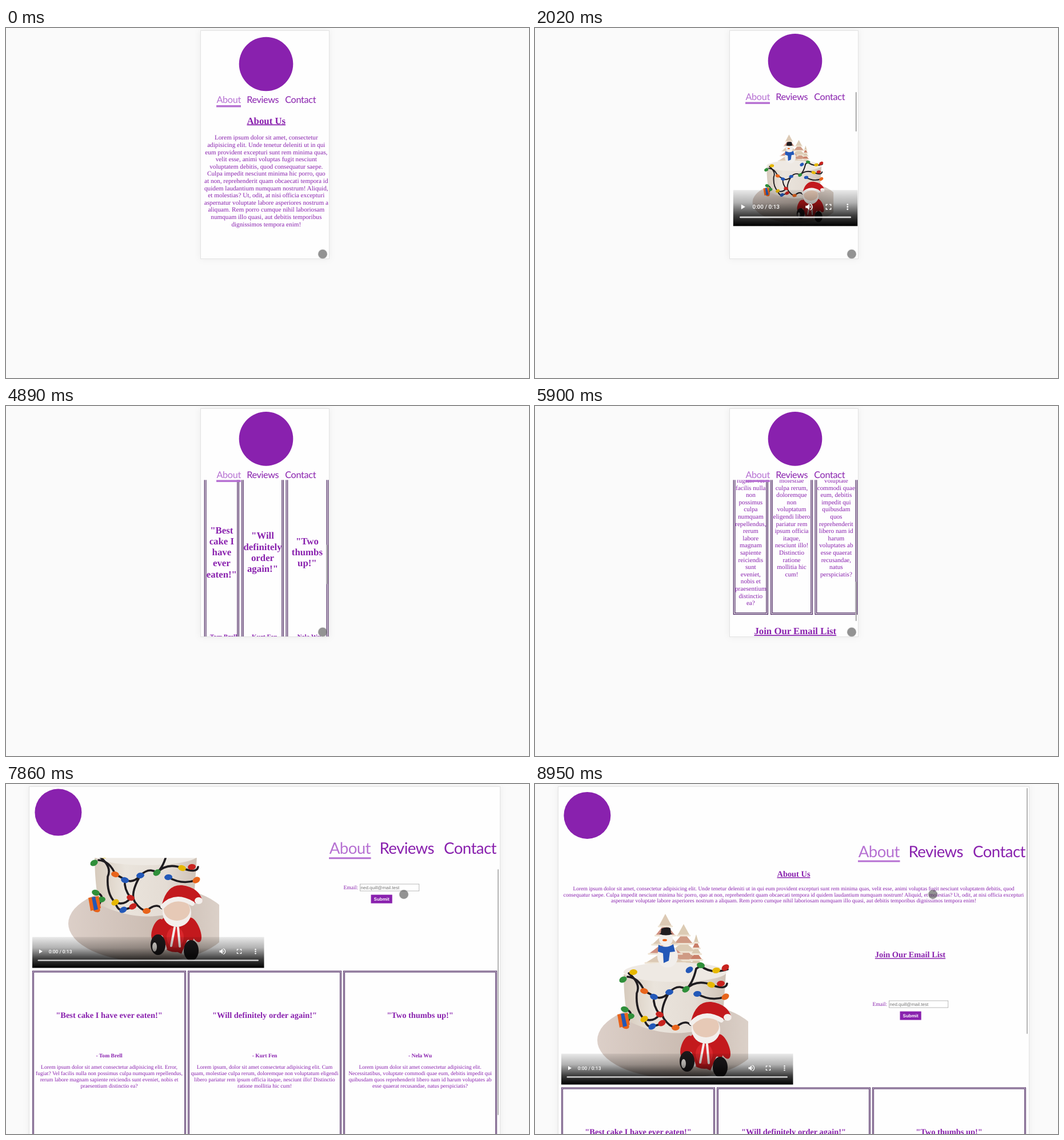
These frames come from a looping animation (915 by 612 pixels, 9250 ms). An HTML page:

```html
<!DOCTYPE html>
<html lang="en">
<head>
<meta charset="utf-8">
<title>Cake shop page</title>
<style>
  html, body { margin: 0; width: 100%; height: 100%; overflow: hidden; background: #fafafa; }
  svg { display: block; width: 100%; height: 100%; }
  text { font-family: "Liberation Serif", "Times New Roman", serif; fill: #8921ae; text-rendering: geometricPrecision; white-space: pre; }
  .nav { font-family: Lato, sans-serif; }
  .sans { font-family: "Liberation Sans", Arial, sans-serif; }
  .time { font-family: Roboto, sans-serif; font-weight: 500; fill: #fff; }
  .sheet { filter: drop-shadow(0 0 6px rgba(0, 0, 0, .06)); }
</style>
</head>
<body>
<svg id="stage" viewBox="0 0 915 612" xmlns="http://www.w3.org/2000/svg"></svg>
<script>
const LOOP = 9250, STEP = 77.75;
const PURPLE = '#8921ae', LILAC = '#b670d2', EDGE = '#4d2862';

const rect = (x, y, w, h, fill, more = '') =>
  `<rect x="${x}" y="${y}" width="${w}" height="${h}" fill="${fill}" ${more}/>`;
const oval = (x, y, rx, ry, fill, more = '') =>
  `<ellipse cx="${x}" cy="${y}" rx="${rx}" ry="${ry}" fill="${fill}" ${more}/>`;
const path = (d, fill, more = '') => `<path d="${d}" fill="${fill}" ${more}/>`;
const text = (x, y, size, str, more = 'text-anchor="middle"') =>
  `<text x="${x}" y="${y}" font-size="${size}" ${more}>${str}</text>`;
const lines = (x, y, size, gap, str, more) =>
  str.split('|').map((s, i) => text(x, y + i * gap, size, s, more)).join('');
const fade = (id, dir, ...stops) => `<linearGradient id="${id}" ${dir}>` + stops.map(([at, color, alpha = 1]) =>
  `<stop offset="${at}" stop-color="${color}" stop-opacity="${alpha}"/>`).join('') + '</linearGradient>';

const BOLD = 'text-anchor="middle" font-weight="bold"';
const TITLE = BOLD + ' text-decoration="underline"';

function tree(x, top, w, h, main, tint) {
  let out = '';
  for (let i = 4; i >= 0; i--) {
    const y = top + h * i / 5, half = w * (i + 2) / 12;
    out += path(`M${x - half} ${y + h / 4}L${x} ${y - 2}L${x + half} ${y + h / 4}Z`, i % 2 ? tint : main);
    out += path(`M${x - half} ${y + h / 4}H${x + half}`, 'none', 'stroke="#eee3d3" stroke-width="3" stroke-linecap="round"');
  }
  return out;
}

function cake() {
  const wire = d => path(d, 'none', 'stroke="#1f1c20" stroke-width="3.6" stroke-linecap="round"');
  const trim = (d, w) => path(d, 'none', `stroke="#f3efec" stroke-width="${w}" stroke-linecap="round"`);
  const hues = ['#2358b8', '#e6b800', '#e8641b', '#2f8f3a', '#c8231f'];
  const bulbs = [[224, 104], [244, 96], [271, 105], [287, 100], [145, 141], [189, 143], [218, 138], [262, 130],
    [279, 128], [287, 151], [162, 151], [121, 185], [145, 190], [172, 182], [200, 205], [159, 203],
    [111, 173], [126, 108], [176, 197], [112, 202], [238, 146], [108, 121]];
  return `<clipPath id="crop">${rect(0, 0, 327, 304.5, '#000')}</clipPath>` +
    fade('icing', '', [0, '#d6cabc'], [.3, '#eae4dc'], [.7, '#e4dcd4'], [1, '#cfc2b6']) +
    fade('board', '', [0, '#dccfc8'], [.6, '#c9bab0'], [1, '#dfd5cd']) +
    '<g id="cake" clip-path="url(#crop)">' +
    oval(204, 227, 141, 67, 'url(#board)') +
    tree(214, 26, 66, 72, '#dccbb4', '#cf9a84') +
    tree(236, 44, 26, 50, '#d9c8b0', '#c97f68') +
    tree(182, 8, 70, 80, '#dcc9b4', '#cf8f80') +
    path('M109 112Q110 170 118 194Q200 234 282 196L288 110Z', 'url(#icing)') +
    oval(199, 108, 90, 17, '#eee9e3') +
    oval(186, 80, 18, 20, '#f1eeeb') + oval(183, 50, 12, 12, '#f1eeeb') +
    path('M170 60Q184 68 196 59L199 72L190 73L188 88L179 92L178 75L169 72Z', '#2358b8') +
    path('M171 41Q183 46 195 41L192 40L191 31Q183 28 175 32L174 40Z', '#1f1c20') +
    oval(181, 52, 4, 2, '#e8641b') +
    wire('M291 103Q262 112 244 97L236 102Q230 128 218 138Q204 128 189 143Q176 158 162 150T145 141Q136 118 116 116') +
    wire('M118 110Q140 128 132 145Q130 176 145 190Q162 196 172 182Q160 166 162 151') +
    wire('M218 138Q236 120 262 130T290 128M189 143Q170 176 180 190T200 205Q216 190 226 200') +
    wire('M110 172Q124 176 121 185T112 202M145 190Q150 206 160 203T176 198M238 146Q262 160 287 151') +
    bulbs.map(([x, y], i) =>
      oval(x, y, 7, 5, hues[i * 3 % 5], `transform="rotate(${i * 47 % 70 - 35} ${x} ${y})"`)).join('') +
    path('M98 182L116 179L120 200L102 205Z', '#e8641b') + path('M104 181L110 180L115 202L108 204Z', '#2358b8') +
    oval(251, 243, 33, 34, '#c3191d') +
    oval(284, 238, 9, 23, '#c3191d', 'transform="rotate(-22 284 238)"') +
    oval(219, 238, 9, 20, '#c3191d', 'transform="rotate(20 219 238)"') +
    oval(234, 262, 17, 11, '#c3191d') + oval(266, 268, 17, 12, '#c3191d') +
    trim('M226 250L233 271M264 279L273 258', 5) +
    oval(253, 208, 25, 25, '#f3efec') + oval(253, 203, 23, 19, '#e6c9b6') +
    path('M227 193Q236 158 262 160Q292 164 298 188L281 192Q254 176 227 193Z', '#c3191d') +
    trim('M228 197Q250 174 280 192', 8) + oval(291, 187, 7, 6, '#f3efec') +
    oval(250, 251, 15, 18, '#d9262b') + trim('M249 234L243 266M255 234L258 267', 4) +
    oval(220, 264, 13, 18, '#1c191b') + oval(278, 274, 13, 18, '#1c191b') + oval(214, 268, 4, 8, '#ece7e2') +
    '</g>';
}

function video(x, y, w, k) {
  const h = w * .751, end = w / k;
  return `<g transform="translate(${x} ${y})"><use href="#cake" transform="scale(${w / 405.5})"/>
    <g transform="translate(0 ${h}) scale(${k})">` +
    rect(0, -90, end, 90, 'url(#shade)') +
    path('M20 -54V-42L30 -48Z', '#fff') +
    text(48, -43, 14, '0:00 / 0:13', 'class="time"') +
    rect(16, -24, end - 32, 4, '#fff', 'rx="2" opacity=".82"') +
    `<g transform="translate(${end - 121} -48)" fill="#fff"><path d="M-9 -3H-5L0 -8V8L-5 3H-9Z"/>
      <path d="M2 -4Q6 0 2 4ZM2 -9Q9 -6 9 0Q9 6 2 9V7Q7 5 7 0Q7 -5 2 -7Z"/></g>
    <path transform="translate(${end - 72.5} -48)" fill="none" stroke="#fff" stroke-width="2"
      d="M-6 -2V-6H-2M2 -6H6V-2M6 2V6H2M-2 6H-6V2"/>` +
    [-54, -48, -42].map(dy => oval(end - 25, dy, 2, 2, '#fff')).join('') +
    '</g></g>';
}

// Signup row, drawn in page pixels around its centre.
const form = (x, y, k) => `<g transform="translate(${x} ${y}) scale(${k})">` +
  text(-110, 4.5, 16, 'Email:', '') +
  rect(-61.5, -10, 172, 20, '#fff', 'stroke="#8a8a8a" stroke-width="1"') +
  text(-60, 5, 13.33, 'ned.quill@mail.test', 'class="sans" style="fill:#757575"') +
  rect(-30, 21, 62, 25, PURPLE) +
  text(1, 38, 13.33, 'Submit', BOLD + ' class="sans" style="fill:#fff"') + '</g>';

function frame(x, y, w, h, line, gap) {
  const ring = d => rect(x + d, y + d, w - 2 * d, h - 2 * d, 'none', `stroke="${EDGE}" stroke-width="${line}"`);
  return ring(line / 2) + ring(line * 1.5 + gap);
}

function header(cx, cy, r, nav, size, base, bar) {
  return oval(cx, cy, r, r, PURPLE) +
    ['About', 'Reviews', 'Contact'].map((s, i) => text(nav[i], base, size, s,
      `class="nav" text-anchor="middle" letter-spacing="-.02em" ${i ? '' : `style="fill:${LILAC}"`}`)).join('') +
    rect(...bar, LILAC);
}

const reviews = [
  { name: '- Tom Brell',
    quote: '"Best cake I have ever eaten!"', tall: '"Best|cake I|have|ever|eaten!"',
    wide: 'Lorem ipsum dolor sit amet consectetur adipisicing elit. Error,|fugiat? Vel facilis nulla non possimus culpa numquam repellendus,|rerum labore magnam sapiente reiciendis sunt eveniet, nobis et|praesentium distinctio ea?',
    thin: 'Lorem|ipsum dolor|sit amet|consectetur|adipisicing|elit. Error,|fugiat? Vel|facilis nulla|non|possimus|culpa|numquam|repellendus,|rerum|labore|magnam|sapiente|reiciendis|sunt|eveniet,|nobis et|praesentium|distinctio|ea?' },
  { name: '- Kurt Fen',
    quote: '"Will definitely order again!"', tall: '"Will|definitely|order|again!"',
    wide: 'Lorem ipsum, dolor sit amet consectetur adipisicing elit. Cum|quam, molestiae culpa rerum, doloremque non voluptatum eligendi|libero pariatur rem ipsum officia itaque, nesciunt illo! Distinctio|ratione mollitia hic cum!',
    thin: 'Lorem ipsum,|dolor sit amet|consectetur|adipisicing|elit. Cum|quam,|molestiae|culpa rerum,|doloremque|non|voluptatum|eligendi libero|pariatur rem|ipsum officia|itaque,|nesciunt illo!|Distinctio|ratione|mollitia hic|cum!' },
  { name: '- Nela Wu',
    quote: '"Two thumbs up!"', tall: '"Two|thumbs|up!"',
    wide: 'Lorem ipsum dolor sit amet consectetur adipisicing elit.|Necessitatibus, voluptate commodi quae eum, debitis impedit qui|quibusdam quos reprehenderit libero nam id harum voluptates ab|esse quaerat recusandae, natus perspiciatis?',
    thin: 'Lorem ipsum|dolor sit amet|consectetur|adipisicing|elit.|Necessitatibus,|voluptate|commodi quae|eum, debitis|impedit qui|quibusdam|quos|reprehenderit|libero nam id|harum|voluptates ab|esse quaerat|recusandae,|natus|perspiciatis?' }
];

const aboutThin = 'Lorem ipsum dolor sit amet, consectetur|adipisicing elit. Unde tenetur deleniti ut in qui|eum provident excepturi sunt rem minima quas,|velit esse, animi voluptas fugit nesciunt|voluptatem debitis, quod consequatur saepe.|Culpa impedit nesciunt minima hic porro, quo|at non, reprehenderit quam obcaecati tempora id|quidem laudantium numquam nostrum! Aliquid,|et molestias? Ut, odit, at nisi officia excepturi|aspernatur voluptate labore asperiores nostrum a|aliquam. Rem porro cumque nihil laboriosam|numquam illo quasi, aut debitis temporibus|dignissimos tempora enim!';
const aboutWide = 'Lorem ipsum dolor sit amet, consectetur adipisicing elit. Unde tenetur deleniti ut in qui eum provident excepturi sunt rem minima quas, velit esse, animi voluptas fugit nesciunt voluptatem debitis, quod|consequatur saepe. Culpa impedit nesciunt minima hic porro, quo at non, reprehenderit quam obcaecati tempora id quidem laudantium numquam nostrum! Aliquid, et molestias? Ut, odit, at nisi officia excepturi|aspernatur voluptate labore asperiores nostrum a aliquam. Rem porro cumque nihil laboriosam numquam illo quasi, aut debitis temporibus dignissimos tempora enim!';

function phoneBody() {
  const cards = [[346.7, 61.3], [412, 74], [489.5, 74.8]];
  return text(455.3, 167.5, 16.8, 'About Us', TITLE) +
    lines(455.3, 195.4, 11.2, 12.6, aboutThin) +
    video(346.8, 789, 217.5, .7) +
    reviews.map((r, i) => {
      const [x, w] = cards[i], mid = x + w / 2;
      const top = 1620 - (r.tall.split('|').length - 1) * 9.6;
      return frame(x, 1449, w, 647, 1.3, 1.2) +
        lines(mid, top, 16.8, 19.2, r.tall, BOLD) +
        text(mid, 1766, 11.2, r.name, BOLD) +
        lines(mid, 1789.4, 11.2, 12.6, r.thin);
    }).join('') +
    text(455.3, 2130.3, 16.8, 'Join Our Email List', TITLE) +
    form(455.3, 2225, .7);
}

function deskBody() {
  return text(452.5, 162, 14.4, 'About Us', TITLE) +
    lines(452.5, 185.8, 9.6, 10.7, aboutWide) +
    video(46, 221, 405.5, .6) +
    text(656.5, 303.4, 14.4, 'Join Our Email List', TITLE) +
    form(656.5, 385, .6) +
    reviews.map((r, i) => {
      const x = 46 + i * 272, mid = x + 134.5;
      return frame(x, 530.5, 269, 352, 1.1, .8) +
        text(mid, 612.8, 14.4, r.quote, BOLD) +
        text(mid, 681.8, 9.6, r.name, BOLD) +
        lines(mid, 702.3, 9.6, 10.8, r.wide);
    }).join('');
}

// Scroll offsets as [step, pixels].
const phone = {
  id: 'phone', box: [341, 5, 224, 398], pad: 5.6, ratio: 1 / 5.77, from: 0,
  keys: [[0, 20], [11, 271], [23, 571], [24, 606], [35, 837], [45, 1042], [47, 1042], [48, 1056],
    [59, 1325], [67, 1460], [70, 1460], [71, 1530], [74, 1731], [80, 1898]],
  body: phoneBody(), thumb: [560.6, 7, 2.4, 69],
  head: header(455, 57.4, 47.3, [389.7, 449.2, 515.2], 16.2, 125.6, [368, 129.4, 43, 3.5])
};
const desk = {
  id: 'desk', box: [41, 5, 823, 640], pad: 5.3, ratio: .696, from: 91,
  keys: [[91, 24], [94, 93.5], [99, 204], [103, 270], [104, 245], [113, 0]],
  body: deskBody(), thumb: [860, 7, 2, 430],
  head: header(91.4, 49.6, 41, [601.8, 701.2, 812], 27.6, 122.3, [565, 128.2, 73.5, 3])
};
const SWITCH = 86;

function view({ id, box: [x, y, w, h], body, head, thumb }) {
  return `<g id="${id}">` +
    rect(x - .5, y - .5, w + 1, h + 1, '#fefefe', 'class="sheet" stroke="#e2e2e2"') +
    `<clipPath id="${id}Clip">${rect(x, y, w, h, '#000')}</clipPath>
    <g clip-path="url(#${id}Clip)"><g id="${id}Body">${body}</g>
    <g id="${id}Head">${rect(x, y - 6, w, 135.3 - y, '#fefefe')}${head}</g>` +
    rect(...thumb, '#b4b4b4', `rx="1" id="${id}Thumb"`) + '</g></g>';
}

const $ = id => document.getElementById(id);
$('stage').innerHTML = '<defs>' +
  fade('shade', 'x2="0" y2="1"', [0, '#000', .08], [.35, '#000', .3], [.7, '#000', .75], [1, '#000']) +
  cake() + '</defs>' + rect(0, 0, 915, 612, '#fafafa') + view(phone) + view(desk) +
  oval(0, 0, 7.5, 7.5, '#333', 'id="touch" fill-opacity=".53" stroke="#888" stroke-opacity=".5" stroke-width="1.6"');

function track(keys, n) {
  if (n < keys[0][0]) return 0;
  for (let i = 1; i < keys.length; i++) {
    const [a, va] = keys[i - 1], [b, vb] = keys[i];
    if (n < b) return va + (vb - va) * (n - a) / (b - a);
  }
  return keys[keys.length - 1][1];
}

function scroll(v, n) {
  const s = track(v.keys, n);
  $(v.id + 'Body').setAttribute('transform', `translate(0 ${-s})`);
  $(v.id + 'Head').setAttribute('transform', `translate(0 ${Math.max(v.pad - s, 0)})`);
  const thumb = $(v.id + 'Thumb');
  thumb.setAttribute('y', 7 + s * v.ratio);
  thumb.setAttribute('visibility', n < v.from ? 'hidden' : 'inherit');
}

function draw(t) {
  const n = Math.floor((t - 140) / STEP);
  const wide = n >= SWITCH;
  $('phone').setAttribute('visibility', wide ? 'hidden' : 'visible');
  $('desk').setAttribute('visibility', wide ? 'visible' : 'hidden');
  scroll(wide ? desk : phone, n);
  $('touch').setAttribute('transform', wide ? 'translate(696 193)' : 'translate(554 395.3)');
}

const start = performance.now();
function tick() {
  draw((performance.now() - start) % LOOP);
  requestAnimationFrame(tick);
}
tick();
</script>
</body>
</html>
```
